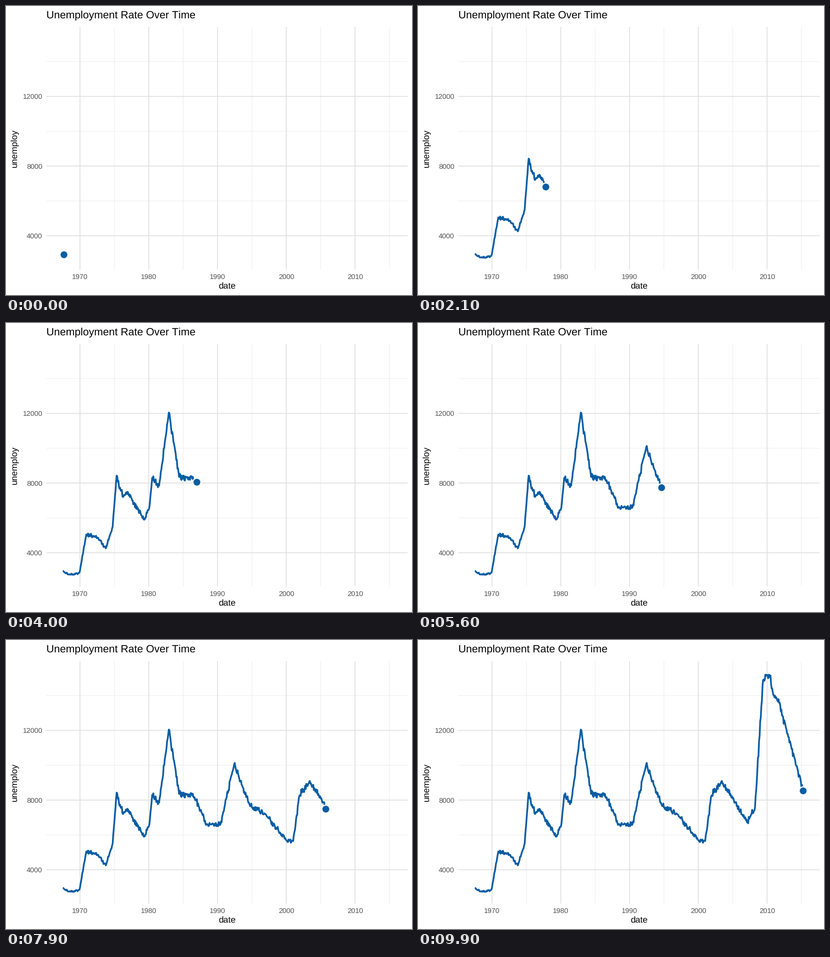
A matplotlib script for the animation above (10 s loop, 885 by 632 pixels).

```python
import matplotlib.pyplot as plt
import numpy as np
from matplotlib.animation import FuncAnimation
from matplotlib.patches import Circle

W, H, DPI = 885, 632, 100
FRAMES, INTERVAL = 100, 100
MONTHS = 574  # July 1967 to April 2015
BLUE = "#085DA3"
LEFT, RIGHT, TOP, BOTTOM = 88, 875.4, 46, 576.4

plt.rcParams.update({
    "font.family": "Liberation Sans",
    "text.hinting": "none",
    "text.kerning_factor": 6,  # plain advances, no kerning
    "path.simplify": False,
})

# Key points of each cycle: months since July 1967, millions unemployed
CYCLES = [
    (0, 2.96), (10, 2.75), (29, 2.85), (41, 5.05), (62, 4.85), (75, 4.25),
    (87, 5.5), (94, 8.43), (105, 7.2), (113, 7.5), (142, 5.9), (151, 6.6),
    (156, 8.3), (168, 7.85), (185, 12.05), (203, 8.35), (227, 8.35),
    (252, 6.6), (275, 6.6), (299, 10.04), (327, 7.65), (353, 7.2),
    (390, 5.7), (402, 5.65), (413, 8.26), (431, 9.1), (476, 6.75),
    (489, 7.6), (502, 14.5), (507, 15.2), (513, 15.2), (523, 13.9),
    (530, 13.8), (573, 8.53),
]


def px(year):
    return 161.3 + (year - 1970) * 14.99


def py(value):
    return 502.4 - (value - 4000) * 0.03808


def series():
    """Cycle trend with a small seeded monthly jitter."""
    rng = np.random.default_rng(7)
    month = np.arange(MONTHS)
    keys, level = zip(*CYCLES)
    trend = 1000 * np.interp(month, keys, level)
    jitter = rng.normal(0, 0.012, MONTHS).clip(-0.025, 0.025)
    jitter[list(keys)] = 0
    return px(1967.5 + month / 12), py(trend * (1 + jitter))


def pt(pixels):
    return pixels * 72 / DPI


def label(x, y, text, size, color="black", **kw):
    ax.text(x, y, text, fontsize=pt(size), color=color, va="baseline", **kw)


def rule(xs, ys, major):
    ax.plot(xs, ys, color="#E0E0E0" if major else "#EAEAEA",
            lw=pt(1.87 if major else 1.0), solid_capstyle="butt",
            snap=False, zorder=2 if major else 1)


fig = plt.figure(figsize=(W / DPI, H / DPI), dpi=DPI, facecolor="white")
ax = fig.add_axes([0, 0, 1, 1])
ax.set(xlim=(0, W), ylim=(H, 0))
ax.set_autoscale_on(False)
ax.axis("off")

for year in range(1970, 2016, 5):
    major = year % 10 == 0
    rule([px(year)] * 2, [TOP, BOTTOM], major)
    if major:
        label(px(year), 596.8, str(year), 15.4, "#4D4D4D", ha="center")

for value in range(4000, 14001, 2000):
    major = value % 4000 == 0
    rule([LEFT, RIGHT], [py(value)] * 2, major)
    if major:
        label(79.3, py(value) + 5.5, str(value), 15.4, "#4D4D4D", ha="right")

label(88, 27.3, "Unemployment Rate Over Time", 23.1)
label(481.6, 618, "date", 19.25, ha="center")
label(23.6, 311.2, "unemploy", 19.25, ha="center", rotation=90,
      rotation_mode="anchor")

xs, ys = series()
trail, = ax.plot([], [], color=BLUE, lw=pt(3.73), solid_capstyle="butt",
                 solid_joinstyle="round", zorder=3)
dot = Circle((xs[0], ys[0]), 8.7, fc=BLUE, ec="white", lw=pt(2.47), zorder=4)
ax.add_patch(dot)


def draw(frame):
    last = min(MONTHS - 1, round(2 + frame * (MONTHS - 1) / (FRAMES - 1)))
    trail.set_data(xs[:last + 1], ys[:last + 1])
    dot.center = xs[last], ys[last]
    return trail, dot


anim = FuncAnimation(fig, draw, frames=FRAMES, interval=INTERVAL,
                     repeat=True, repeat_delay=0, blit=False)
plt.show()
```
